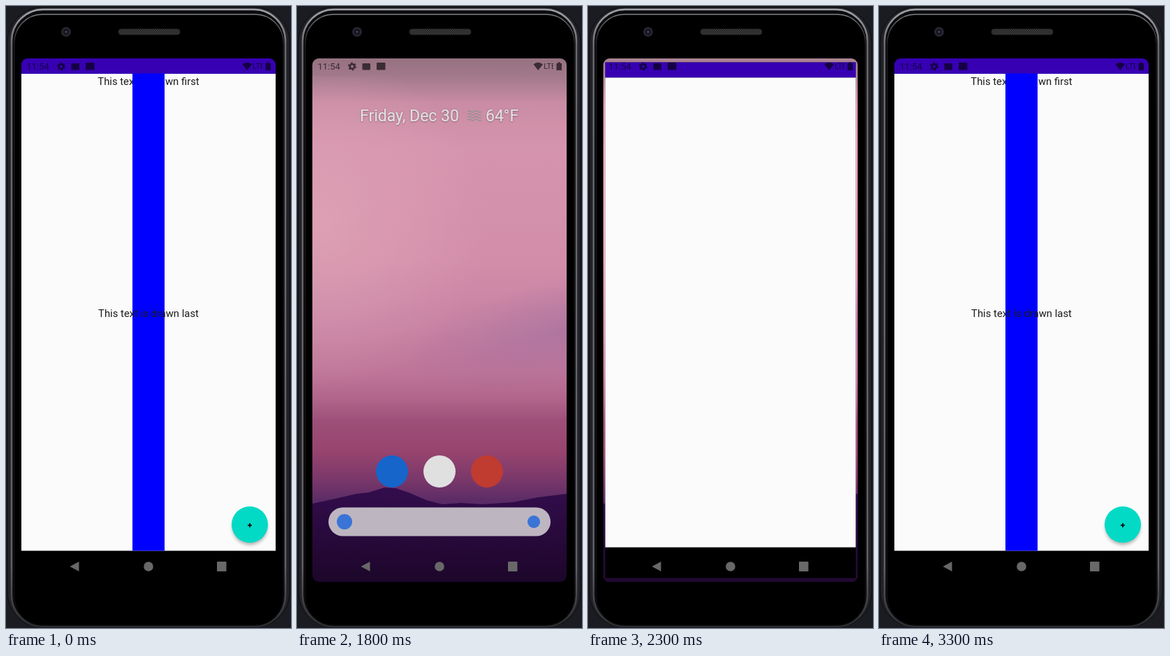
Write an HTML page that moves like this. It is 408 px wide and 890 px high and loops after 5400 ms.

```html
<!DOCTYPE html>
<html lang="en">
<head>
<meta charset="utf-8">
<title>Phone screen</title>
<style>
  html, body { margin: 0; width: 100%; height: 100%; overflow: hidden; background: #1b1c21; }
  svg { display: block; width: 100%; height: 100%; }
  text { font-family: Roboto, Arial, sans-serif; }
</style>
</head>
<body>
<svg viewBox="0 0 408 890" xmlns="http://www.w3.org/2000/svg">
  <defs>
    <clipPath id="screenClip"><rect x="22" y="75" width="364" height="749" rx="9"/></clipPath>
    <clipPath id="networkClip"><rect x="352" y="78" width="15" height="16"/></clipPath>
    <linearGradient id="sky" gradientUnits="userSpaceOnUse" x1="0" y1="75" x2="0" y2="715">
      <stop offset="0" stop-color="#ab8292"/>
      <stop offset=".04" stop-color="#b98a9f"/>
      <stop offset=".1" stop-color="#e6a0bb"/>
      <stop offset=".2" stop-color="#f3a9c6"/>
      <stop offset=".45" stop-color="#f0a2c1"/>
      <stop offset=".6" stop-color="#e294ba"/>
      <stop offset=".7" stop-color="#d985ae"/>
      <stop offset=".76" stop-color="#cb749f"/>
      <stop offset=".81" stop-color="#b35b8a"/>
      <stop offset=".88" stop-color="#ac4e7e"/>
      <stop offset=".94" stop-color="#8c4079"/>
      <stop offset="1" stop-color="#613075"/>
    </linearGradient>
    <radialGradient id="glow" gradientUnits="userSpaceOnUse" cx="30" cy="310" r="240">
      <stop offset="0" stop-color="#ffbcd0" stop-opacity=".75"/>
      <stop offset="1" stop-color="#ffbcd0" stop-opacity="0"/>
    </radialGradient>
    <radialGradient id="haziness" gradientUnits="userSpaceOnUse" cx="0" cy="0" r="1"
        gradientTransform="translate(386 465) rotate(-12) scale(230 75)">
      <stop offset="0" stop-color="#b47cb4" stop-opacity=".55"/>
      <stop offset="1" stop-color="#b47cb4" stop-opacity="0"/>
    </radialGradient>
    <linearGradient id="hills" x1="0" y1="0" x2="0" y2="1">
      <stop offset="0" stop-color="#3b0f58"/>
      <stop offset="1" stop-color="#210830"/>
    </linearGradient>
    <linearGradient id="rim" x1="0" y1="0" x2="0" y2="1">
      <stop offset="0" stop-color="#a0a1a6"/>
      <stop offset=".06" stop-color="#68696e"/>
      <stop offset=".9" stop-color="#606166"/>
      <stop offset="1" stop-color="#2c2d31"/>
    </linearGradient>
    <linearGradient id="lip" x1="0" y1="0" x2="0" y2="1">
      <stop offset="0" stop-color="#808186"/>
      <stop offset=".05" stop-color="#1c1c1f"/>
      <stop offset="1" stop-color="#0c0c0e"/>
    </linearGradient>
    <pattern id="mesh" width="3" height="3" patternUnits="userSpaceOnUse">
      <rect width="3" height="3" fill="#161616"/>
      <path d="M0 0h1.5v1.5h1.5v1.5h-1.5v-1.5h-1.5z" fill="#4a4a4a"/>
    </pattern>
    <filter id="soft" x="-50%" y="-50%" width="200%" height="200%"><feGaussianBlur stdDeviation="2.5"/></filter>
    <filter id="textShadow"><feDropShadow dx="0" dy=".5" stdDeviation=".8" flood-opacity=".45"/></filter>
  </defs>

  <rect width="408" height="890" fill="#1b1c21"/>
  <g id="body">
    <rect x="2" y="1.500" width="404" height="887.500" rx="50" fill="#222328" stroke="#0c0c0f"/>
    <rect x="8" y="5" width="392" height="883" rx="45" fill="#0b0b0d" stroke="url(#rim)" stroke-width="2.500"/>
    <rect x="12" y="12" width="385" height="874" rx="40" fill="#000" stroke="url(#lip)" stroke-width="1.300"/>
    <circle cx="86" cy="37" r="7" fill="#25252e"/>
    <circle cx="86" cy="37" r="4" fill="#141421"/>
    <circle cx="86" cy="37" r="1.5" fill="#484862"/>
    <rect x="161" y="33" width="88" height="8" rx="4" fill="url(#mesh)" stroke="#2c2c2c" stroke-width=".8"/>
  </g>

  <g clip-path="url(#screenClip)">
    <g id="home">
      <rect x="22" y="75" width="364" height="749" fill="url(#sky)"/>
      <rect x="22" y="100" width="364" height="470" fill="url(#glow)"/>
      <rect x="22" y="340" width="364" height="260" fill="url(#haziness)"/>
      <path d="M22 712L50 706L85 698L103 696L125 689L142 690L162 697L185 707L208 713L235 711L265 713L310 710L345 703L386 698V824H22Z" fill="url(#hills)"/>
      <g fill="#fff" font-size="23" filter="url(#textShadow)">
        <text x="90" y="165">Friday, Dec 30</text>
        <text x="270" y="165">64°F</text>
      </g>
      <g id="haze" fill="none" stroke="#a9a6a4" stroke-width="1.6"></g>
      <circle cx="136" cy="666" r="23" fill="#1a73e8"/>
      <circle cx="204" cy="666" r="23" fill="#fff"/>
      <circle cx="272" cy="666" r="23" fill="#db4437"/>
      <rect x="45" y="717.500" width="318" height="41" rx="20.5" fill="#d8d0dc"/>
      <circle cx="68" cy="738" r="11" fill="#4285f4"/>
      <circle cx="339" cy="738" r="9" fill="#4285f4"/>
    </g>

    <g id="app">
      <rect x="22" y="75" width="364" height="749" fill="#000"/>
      <rect x="22" y="97" width="364" height="682.500" fill="#fbfbfb"/>
      <rect x="22" y="75" width="364" height="22" fill="#3700b3"/>
      <g id="content">
        <g fill="#1c1c1c" font-size="14.83" text-anchor="middle">
          <text x="204" y="113">This text is drawn first</text>
          <rect x="181" y="96.500" width="46" height="683" fill="#00f"/>
          <text x="204" y="444.500">This text is drawn last</text>
        </g>
        <circle cx="349" cy="746" r="25" opacity=".3" filter="url(#soft)"/>
        <circle cx="349" cy="742" r="26" fill="#03dac5"/>
        <path d="M346 743h6M349 740v6" stroke="#000" stroke-width="1.7"/>
      </g>
    </g>

    <g id="status">
      <text x="29.500" y="91" font-size="13">11:54</text>
      <circle cx="79" cy="86.500" r="3.300" fill="none" stroke="#000" stroke-width="2.600"/>
      <circle cx="79" cy="86.500" r="5.200" fill="none" stroke="#000" stroke-width="1.600" stroke-dasharray="2.700 2.745"/>
      <rect x="93.500" y="82" width="11.500" height="9.500" rx="1"/>
      <rect x="114" y="81" width="12.500" height="10.500" rx="1"/>
      <path d="M338.500 83.500Q345 78 352 83.500L345.200 92Z"/>
      <text x="353" y="90" font-size="11" clip-path="url(#networkClip)">LTE</text>
      <path d="M371.500 82h2v-1.500h3.500V82h2V92h-7.500z"/>
    </g>
  </g>

  <g fill="#686868">
    <path d="M91.500 802L104.500 795V809Z"/>
    <circle cx="204" cy="802" r="6.800"/>
    <rect x="302" y="795" width="13.500" height="14" rx=".8"/>
  </g>
</svg>

<script>
  const LOOP = 5400;
  const byId = id => document.getElementById(id);
  const [home, app, content, status] = ["home", "app", "content", "status"].map(byId);

  byId("haze").innerHTML = [151, 155, 159, 163]
    .map(y => `<path d="M244 ${y}q2.500-2 5 0t5 0t5 0t5 0"/>`).join("");

  const show = (node, opacity) => {
    node.setAttribute("opacity", opacity);
    node.style.display = opacity ? "inline" : "none";
  };

  // Opacity and scale of the app window; it opens in 100 ms steps.
  function appWindow(t) {
    if (t < 1600) return [1, 1];
    if (t < 2200) return [0, 1];
    if (t < 2300) return [.78, .915];
    if (t < 2400) return [1, .985];
    return [1, 1];
  }

  function draw(t) {
    const [opacity, scale] = appWindow(t);
    const homeOpacity = t < 1800 || t >= 2400 ? 0 : t < 1900 ? .88 : 1;
    show(home, homeOpacity);
    show(app, opacity);
    app.setAttribute("transform", `translate(204 449.500) scale(${scale}) translate(-204 -449.500)`);
    show(content, t < 1600 || t >= 3100 ? 1 : 0);
    show(status, t >= 1600 && t < 1800 ? 0 : .62);
  }

  function tick() {
    draw(performance.now() % LOOP);
    requestAnimationFrame(tick);
  }
  tick();
</script>
</body>
</html>
```
